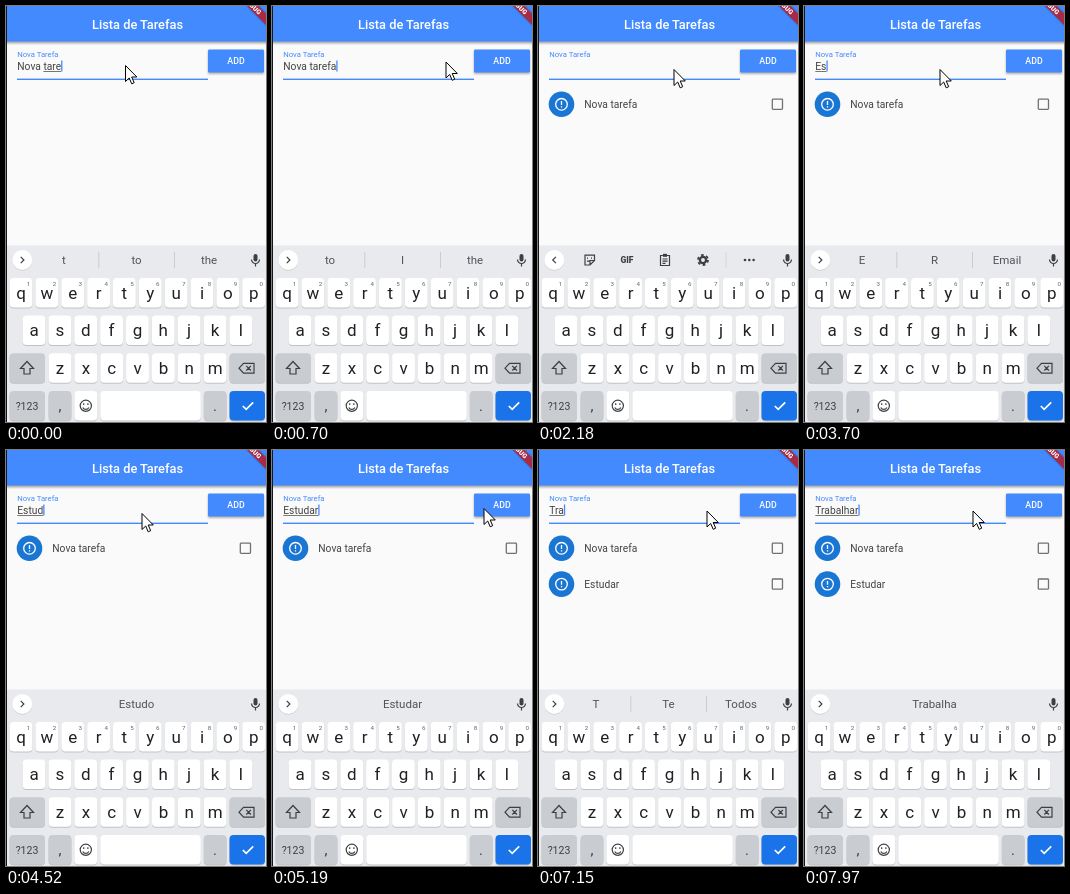
Recreate the animation shown at these times as an HTML page. Size 260x416 px, loop 8 s.

```html
<!DOCTYPE html>
<html lang="pt">
<head>
<meta charset="utf-8">
<title>Lista de Tarefas</title>
<style>
  html, body { margin: 0; width: 100%; height: 100%; overflow: hidden; background: #fafafa; }
  svg { display: block; width: 260px; height: 416px; font-family: Roboto, sans-serif; }
  text { white-space: pre; }
  .mid { text-anchor: middle; }
  .line { fill: none; stroke: #3c4043; stroke-width: 1.2; }
  .dark { fill: #3c4043; }
  .body { font-size: 10.25px; fill: #434343; }
</style>
</head>
<body>
<svg viewBox="0 0 260 416">
  <defs>
    <filter id="soft" x="-20%" y="-40%" width="140%" height="200%"><feGaussianBlur stdDeviation="1.3"/></filter>
    <clipPath id="btn"><rect x="202" y="43.5" width="56" height="23" rx="1.3"/></clipPath>
  </defs>
  <rect width="260" height="416" fill="#fafafa"/>

  <rect x="-5" y="2" width="270" height="35.3" fill="#000" opacity=".35" filter="url(#soft)"/>
  <rect width="260" height="35.5" fill="#448aff"/>
  <text class="mid" x="131.5" y="22.5" font-size="12.8" font-weight="500" fill="#fff">Lista de Tarefas</text>
  <g transform="translate(246.8 0) rotate(45)">
    <rect x="-30" y="-3.9" width="60" height="7.8" fill="#000" opacity=".4" filter="url(#soft)"/>
    <rect x="-30" y="-3.9" width="60" height="7.8" fill="#a82a45"/>
    <text class="mid" y="2.3" font-size="6.5" font-weight="900" fill="#fff">DEBUG</text>
  </g>

  <text x="11.3" y="51" font-size="7.7" fill="#448aff">Nova Tarefa</text>
  <text id="entry" class="body" x="11.3" y="63.6"></text>
  <rect id="mark" y="65.2" height=".8" fill="#555"/>
  <rect id="caret" y="54.5" width="1.3" height="11" fill="#448aff"/>
  <rect x="11" y="72.6" width="191" height="1.4" fill="#448aff"/>

  <rect id="shade" x="202" y="45" width="56" height="23" fill="#000" filter="url(#soft)"/>
  <g clip-path="url(#btn)">
    <rect x="202" y="43" width="56" height="24" fill="#448aff"/>
    <circle id="ripple" cx="244" cy="53" r="8" fill="#fff" opacity=".2"/>
  </g>
  <text class="mid" x="230" y="58.2" font-size="8.8" font-weight="500" fill="#fff">ADD</text>

  <g id="list"></g>

  <rect y="239.5" width="260" height="177" fill="#e8eaed"/>
  <g id="keys"></g>

  <circle cx="16.3" cy="254.8" r="10" fill="#000" opacity=".12"/>
  <circle cx="16.3" cy="254" r="10" fill="#fff"/>
  <path id="chevron" class="line" d="M-1.6 -3.2L1.6 0L-1.6 3.2"/>
  <g transform="translate(249.5 254)" class="line">
    <rect x="-2" y="-6" width="4" height="7.6" rx="2" class="dark" stroke="none"/>
    <path d="M-4 -.5a4 4 0 0 0 8 0M0 3.5v3"/>
  </g>
  <g id="words">
    <path id="split" d="M92.8 246v16M168.5 246v16" stroke="#c9ccd1"/>
    <g id="hints"></g>
  </g>
  <g id="tools">
    <path class="line" d="M52 259h-5V249.200h9.500v5.300zM52 259v-4.500h4.500M49 252.200h1M53 252.200h1M49 255.200h2.500"/>
    <text class="mid dark" x="89" y="257.200" font-size="8.500" font-weight="900">GIF</text>
    <path class="line" d="M122.500 249.500h9v10h-9zM124.500 253h5M124.500 255.200h5M124.500 257.400h3"/>
    <rect class="dark" x="125" y="247.800" width="4" height="3"/>
    <circle class="line" cx="165" cy="254" r="3.100" style="stroke-width:2.300"/>
    <circle class="line" cx="165" cy="254" r="5" stroke-dasharray="2.700 2.536" style="stroke-width:1.800"/>
    <path d="M188 246v16" stroke="#d4d7db"/>
    <g class="dark"><circle cx="207" cy="254" r="1.300"/><circle cx="211.300" cy="254" r="1.300"/><circle cx="215.600" cy="254" r="1.300"/></g>
  </g>

  <rect width="1" height="416" fill="#161616"/>
  <path id="arrow" d="M0 0V16L3.700 12.500L6.200 18.300L8.700 17.200L6.200 11.500H11.300Z" fill="#fff" stroke="#000" stroke-linejoin="round"/>
</svg>
<script>
const $ = id => document.getElementById(id);
const label = (s, x, y, size, extra = '') =>
  `<text class="mid" x="${x}" y="${y}" font-size="${size}" ${extra}>${s}</text>`;
const show = (id, on) => $(id).style.display = on ? '' : 'none';

// Keyboard
const key = (x, y, w, fill = '#fff') =>
  `<rect x="${x}" y="${y + 1}" width="${w}" height="29.5" rx="4" fill="#bfc2c7"/>
   <rect x="${x}" y="${y}" width="${w}" height="29.5" rx="4" fill="${fill}"/>`;
const row = (letters, first, y, digits = '') => [...letters].map((c, i) => {
  const x = first + i * 25.85;
  return key(x - 11.4, y, 22.8) + label(c, x, y + 20.5, 17, 'fill="#202124"') +
    (digits ? label(digits[i], x + 7.6, y + 7.6, 6.2, 'fill="#5f6368"') : '');
}).join('');
const GREY = '#c9ccd1';
$('keys').innerHTML =
  row('qwertyuiop', 15, 272, '1234567890') + row('asdfghjkl', 28, 309.5) + row('zxcvbnm', 54, 347.3) +
  key(3.5, 347.3, 35.5, GREY) + key(223.5, 347.3, 35.5, GREY) +
  key(3.5, 385, 35.5, GREY) + key(42.6, 385, 22.8, GREY) + key(68.4, 385, 22.8) +
  key(94.3, 385, 100.5) + key(197.8, 385, 22.8, GREY) + key(223.5, 385, 35.5, '#1a73e8') +
  label('?123', 21, 403.6, 10.5, 'fill="#3c4043"') +
  label(',', 54, 405, 15, 'fill="#3c4043"') + label('.', 209, 405, 15, 'fill="#3c4043"') +
  `<g class="line">
    <path d="M21 355.500l-6.500 7h3.500v5.500h6v-5.500h3.500z"/>
    <path d="M237.500 357.300h10.500v9.800h-10.500l-4.500-4.900zM240.300 359.900l4.600 4.600m0-4.600l-4.600 4.600"/>
    <circle cx="79.800" cy="399.800" r="5.600"/>
    <path d="M76.800 401.500a3.300 3.300 0 0 0 6 0M77.700 397.300v1.600M81.900 397.300v1.600"/>
    <path d="M236.800 400l3.400 3.400l7-7" style="stroke:#fff;stroke-width:1.700"/>
  </g>`;

// Task list
$('list').innerHTML = ['Nova tarefa', 'Estudar'].map((name, i) =>
  `<g transform="translate(0 ${98.3 + i * 35.8})">
    <circle cx="23.500" r="12.800" fill="#1976d2"/>
    <circle cx="23.500" r="5.800" fill="none" stroke="#fff" stroke-width="1.300"/>
    <path d="M23.500 -3.200V.7M23.500 1.900v1.300" stroke="#fff" stroke-width="1.300"/>
    <text class="body" x="46.300" y="3.700">${name}</text>
    <rect x="234.300" y="-5.100" width="10.200" height="10.200" rx=".8" fill="none" stroke="#717171" stroke-width="1.300"/>
  </g>`).join('');

// Each step changes only the listed properties; bar null shows the toolbar.
const STEPS = [
  [0, { text: 'Nova tare', mark: 5, caret: 1, bar: ['t', 'to', 'the'], at: [119.5, 59.5], items: 0, press: 0 }],
  [130, { text: 'Nova taref' }],
  [270, { text: 'Nova tarefa', bar: ['tarefa'] }],
  [400, { mark: 99, bar: ['to', 'I', 'the'] }],
  [540, { at: [135, 58] }],
  [680, { at: [174, 56] }],
  [820, { at: [216, 54] }],
  [950, { at: [240, 53.5] }],
  [1090, { at: [244, 53.5] }],
  [1520, { caret: 0, press: 1 }],
  [1650, { press: 0, text: '', mark: 0, caret: 1, items: 1 }],
  [1780, { at: [236, 55] }],
  [1920, { at: [202, 59], bar: null }],
  [2050, { at: [156, 63] }],
  [2180, { at: [136, 63.5], caret: 0 }],
  [2750, { caret: 1 }],
  [3180, { caret: 0 }],
  [3580, { text: 'E', caret: 1 }],
  [3700, { text: 'Es', bar: ['E', 'R', 'Email'] }],
  [3850, { text: 'Est' }],
  [3970, { bar: ['Est', 'Esta', 'Este'] }],
  [4370, { text: 'Estu' }],
  [4500, { text: 'Estud', bar: ['Estudo'] }],
  [4640, { text: 'Estuda' }],
  [4780, { text: 'Estudar', bar: ['Estudar'] }],
  [4910, { at: [150, 63] }],
  [5050, { at: [188, 60] }],
  [5190, { at: [212, 58.5] }],
  [5340, { caret: 0 }],
  [5490, { at: [231, 56] }],
  [5620, { press: 1 }],
  [5760, { press: 0, text: '', caret: 1, items: 2 }],
  [5890, { at: [203, 59], bar: null }],
  [6030, { at: [169, 61] }],
  [6300, { caret: 0 }],
  [6730, { caret: 1 }],
  [6860, { text: 'T' }],
  [7000, { text: 'Tr', bar: ['T', 'Te', 'Todos'] }],
  [7130, { text: 'Tra' }],
  [7270, { text: 'Trab', bar: ['Tra', 'Trás', 'Traz'] }],
  [7550, { text: 'Traba' }],
  [7690, { text: 'Trabal', bar: ['Trabalho'] }],
  [7830, { text: 'Trabalha' }],
  [7970, { text: 'Trabalhar', bar: ['Trabalha'] }]
];
const LOOP = 8000, LEFT = 11.3;
const pen = document.createElement('canvas').getContext('2d');
const width = s => {
  pen.font = '10.25px Roboto, sans-serif';
  return pen.measureText(s).width;
};

let last = -1;
function draw(index) {
  const s = Object.assign({}, ...STEPS.slice(0, index + 1).map(step => step[1]));
  const end = LEFT + width(s.text), start = LEFT + width(s.text.slice(0, s.mark));
  $('entry').textContent = s.text;
  $('mark').setAttribute('x', start);
  $('mark').setAttribute('width', Math.max(0, end - start));
  $('caret').setAttribute('x', end);
  show('caret', s.caret);
  show('ripple', s.press);
  $('shade').setAttribute('opacity', s.press ? .5 : .3);
  [...$('list').children].forEach((tile, i) => tile.style.display = i < s.items ? '' : 'none');
  show('words', s.bar);
  show('tools', !s.bar);
  $('chevron').setAttribute('transform', `translate(16.3 254) scale(${s.bar ? 1 : -1} 1)`);
  if (s.bar) {
    const many = s.bar.length > 1;
    show('split', many);
    $('hints').innerHTML = s.bar.map((w, i) =>
      label(w, many ? 58 + i * 72.5 : 130.5, 258.2, 11.5, 'fill="#50545a"')).join('');
  }
  $('arrow').setAttribute('transform', `translate(${s.at})`);
}
function tick() {
  const t = performance.now() % LOOP;
  const index = STEPS.filter(step => step[0] <= t).length - 1;
  if (index !== last) draw(last = index);
  requestAnimationFrame(tick);
}
tick();
</script>
</body>
</html>
```
